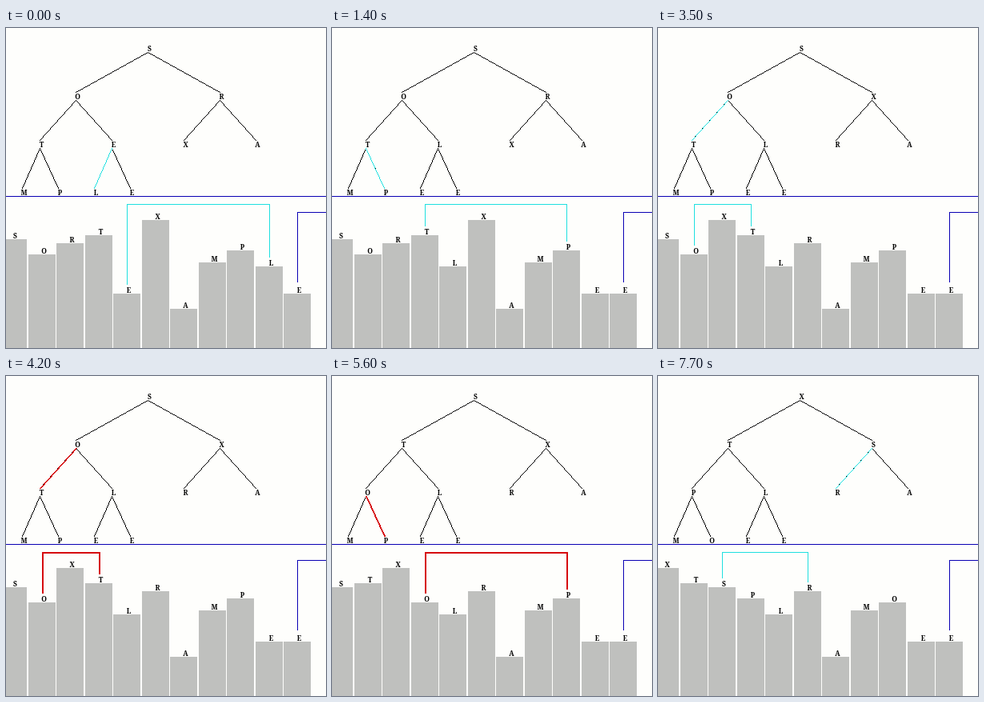
Write an HTML page with a canvas that moves like this. It is 400x400 px and loops after 8000 ms.

```html
<!DOCTYPE html>
<html>
<head>
<meta charset="utf-8">
<title>Heap construction</title>
<style>
  html, body { margin: 0; width: 100%; height: 100%; overflow: hidden; background: #fefefc; }
  canvas { display: block; }
</style>
</head>
<body>
<canvas id="stage" width="400" height="400"></canvas>
<script>
const ctx = document.getElementById('stage').getContext('2d');
const LOOP = 8000, STEP = 700;
const PAPER = '#fefefc', GREY = '#bfc0be', BLACK = '#000', BLUE = '#0a00b4', CYAN = '#20e0e0', RED = '#d60c10';

// Each comparison shows in cyan; if the child is larger, red follows and then the swap.
const steps = [];
const heap = [...'SORTEXAMPLE'];
for (const [parent, child] of [[4, 9], [3, 8], [2, 5], [1, 3], [3, 8], [0, 2], [2, 5]]) {
  const show = swap => steps.push({ keys: [...heap], parent, child, swap });
  show(false);
  if (heap[child] > heap[parent]) {
    show(true);
    [heap[parent], heap[child]] = [heap[child], heap[parent]];
  }
}

const nodes = heap.map((_, i) => {
  const level = Math.floor(Math.log2(i + 1));
  const gap = 360 / 2 ** level;
  const place = i + 1 - 2 ** level;
  return { x: Math.ceil(-3 + gap * (place + 0.5)), y: 30 + 60 * level };
});

const barX = i => Math.floor(9.5 + 35.5 * i);
const barTop = key => Math.floor(351.6 - 4.85 * (key.charCodeAt(0) - 65));

function rect(x, y, w, h, color) {
  ctx.fillStyle = color;
  ctx.fillRect(x, y, w, h);
}

// Unsmoothed line; exact halves round away from the start, so direction matters.
function line(x0, y0, x1, y1, color, width = 1) {
  const dx = x1 - x0, dy = y1 - y0;
  const n = Math.max(Math.abs(dx), Math.abs(dy));
  const at = (d, k) => Math.sign(d) * Math.floor((2 * Math.abs(d) * k + n) / (2 * n));
  for (let k = 0; k <= n; k++) rect(x0 + at(dx, k), y0 + at(dy, k), width, 1, color);
}

function label(key, x, y) {
  ctx.fillStyle = BLACK;
  ctx.fillText(key, x + 2.5, y - 1);
}

function bracket(keys, i, j, color, width) {
  const left = barX(i), right = barX(j), top = 220;
  rect(left, top, right - left + width, width, color);
  for (const k of [i, j]) rect(barX(k), top, width, barTop(keys[k]) - 11 - top, color);
}

function drawTree({ keys, parent, child, swap }) {
  nodes.forEach((node, i) => {
    if (i) {
      const up = nodes[(i - 1) >> 1];
      line(up.x, up.y, node.x, node.y - 10, BLACK);
    }
    label(keys[i], node.x, node.y);
  });
  const a = nodes[parent], b = nodes[child];
  line(b.x, b.y - 10, a.x, a.y, swap ? RED : CYAN, swap ? 2 : 1);
}

function drawBars({ keys, parent, child, swap }) {
  keys.forEach((key, i) => {
    const top = barTop(key);
    rect(barX(i) - 17, top, 34, 400 - top, GREY);
    label(key, barX(i), top);
  });
  bracket(keys, parent, child, swap ? RED : CYAN, swap ? 2 : 1);
}

function draw(now) {
  const step = steps[Math.floor(now % LOOP / STEP)];
  rect(0, 0, 400, 400, PAPER);
  ctx.font = 'bold 8.5px "Noto Serif", "Liberation Serif", serif';
  ctx.textAlign = 'center';
  drawTree(step);
  rect(0, 210, 400, 1, BLUE);
  drawBars(step);
  // Open bracket marking the end of the heap
  rect(364, 230, 36, 1, BLUE);
  rect(364, 230, 1, 88, BLUE);
}

const start = performance.now();
function tick() {
  draw(performance.now() - start);
  requestAnimationFrame(tick);
}
tick();
</script>
</body>
</html>
```
